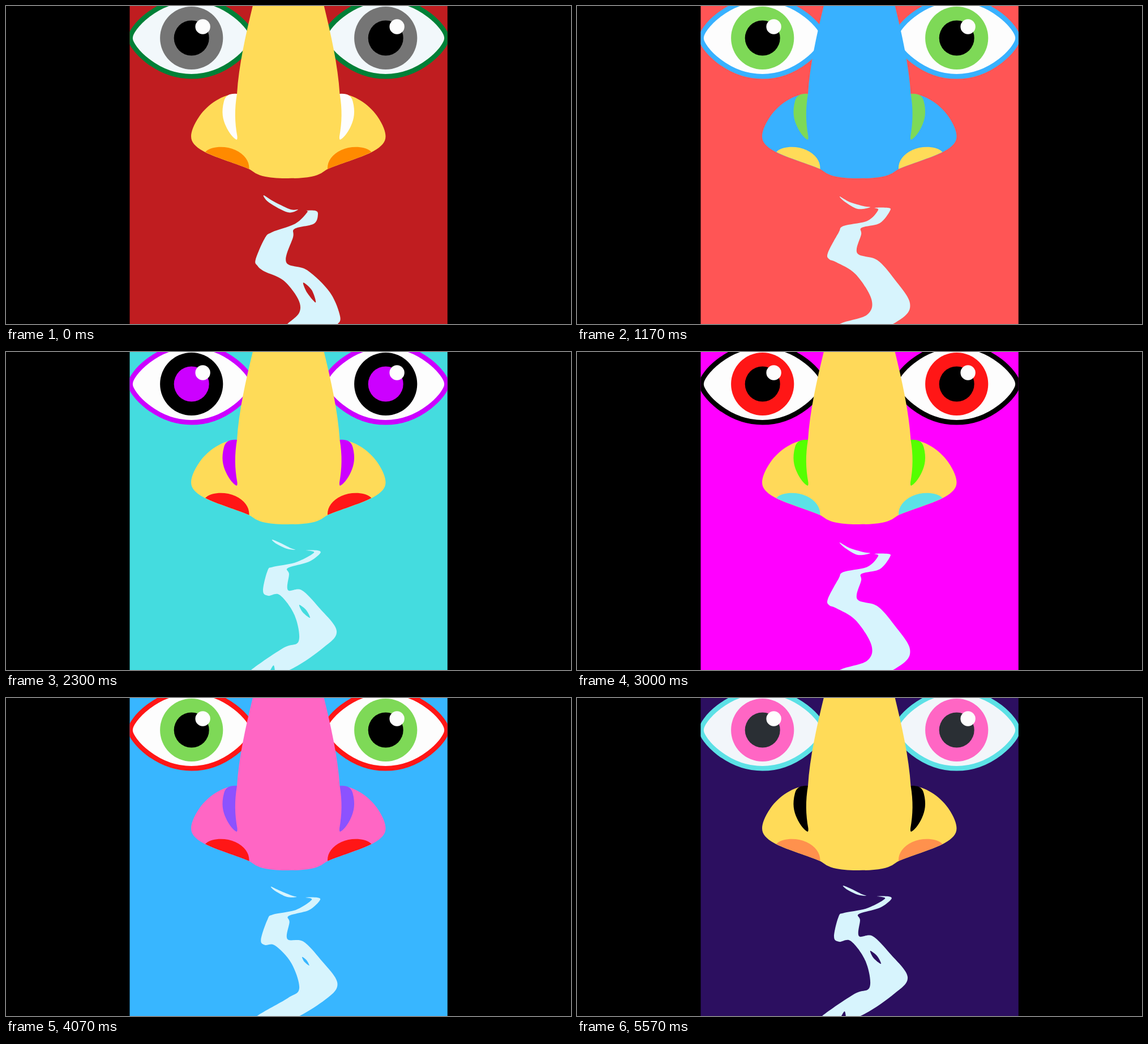
These frames come from a looping animation (998x561 px, 5.6 s). An HTML page:

```html
<!DOCTYPE html>
<html lang="en">
<head>
<meta charset="utf-8">
<title>Breath</title>
<style>
  html, body { margin: 0; height: 100%; overflow: hidden; background: #000; }
  svg { display: block; width: 100vw; height: 100vh; }
  .bg { fill: var(--bg); }
  .lid { fill: var(--white); stroke: var(--lid); stroke-width: 8.6; }
  .iris { fill: var(--iris); }
  .pupil { fill: var(--pupil); }
  .glint { fill: #fdfdfd; }
  .nose { fill: var(--nose); }
  .crease { fill: var(--crease); }
  .nostril { fill: var(--nostril); }
  .smoke { fill: #d7f4fd; fill-rule: evenodd; }
</style>
</head>
<body>
<svg viewBox="0 0 998 561">
  <defs>
    <clipPath id="card"><rect x="218.5" width="561.3" height="561"/></clipPath>
    <g id="eye">
      <path class="lid" d="M219.5 56.5C219.5 74 266 124.3 327.5 124.3S435.5 74 435.5 56.5S389 -11.3 327.5 -11.3S219.5 39 219.5 56.5Z"/>
      <circle class="iris" cx="327.7" cy="56.5" r="55.6"/>
      <circle class="pupil" cx="327.7" cy="56.5" r="31"/>
      <circle class="glint" cx="347.6" cy="36.5" r="13.2"/>
    </g>
    <g id="half">
      <path class="nose" d="M436 -1C424 48 411 105 408 155C383 155 356 174 342 194C331 210 327 222 327 230C327 241 335 249 352 258C372 268 410 279 430 288C437 292 442 298 458 301C470 303.5 484 304 499.5 304V-1Z"/>
      <path class="crease" d="M408 155C396 154 388 157 385 168C380 187 383 200 388 211C394 225 403 234 406.5 235.5Q409 237 408.5 230C404 205 403.5 182 408 155Z"/>
      <path class="nostril" d="M352 257.5C362 247 388 246 405 254C422 262 430 274 429.5 287.5C410 279 372 268 352 257.5Z"/>
    </g>
  </defs>
  <rect width="998" height="561"/>
  <g clip-path="url(#card)">
    <rect class="bg" x="218" width="563" height="561"/>
    <use href="#eye"/>
    <use href="#eye" x="343"/>
    <use href="#half"/>
    <use href="#half" transform="translate(997.5) scale(-1 1)"/>
    <path class="smoke" id="smoke"/>
  </g>
</svg>
<script>
const LOOP = 5600, FRAMES = 168, PER_CARD = 14;

const keys = ['bg', 'lid', 'iris', 'pupil', 'nose', 'crease', 'nostril', 'white'];
const cards = [
  '#c01d20 #008037 #757575 #000 #ffdb58 #fdfdfd #ff8a00 #f2f8fb',
  '#5ce1e6 #000 #ff914d #000 #ff66c4 #ffde59 #8c52ff #fdfdfd',
  '#ff5555 #38b1ff #7ed957 #000 #38b1ff #7ed957 #ffdb58 #fdfdfd',
  '#ff914d #004aad #8c52ff #000 #7ed957 #004aad #ff1616 #fdfdfd',
  '#44dcdf #cc00ff #000 #cc00ff #fedb58 #cc00ff #ff1616 #fdfdfd',
  '#7ed957 #000 #38b6ff #000 #ff914d #ff1616 #000 #fdfdfd',
  '#ff00ff #000 #ff1616 #000 #ffd959 #55ff00 #5ce1e6 #fdfdfd',
  '#fddb58 #000 #004aad #000 #ff1616 #004aad #000 #fdfdfd',
  '#38b6ff #ff1616 #7ed957 #000 #ff66c4 #8c52ff #ff1616 #fdfdfd',
  '#000 #ffff00 #c969e6 #000 #ff914d #fff900 #8c52ff #fdfdfd',
  '#ff66c4 #004aad #5ce1e6 #000 #ffde59 #ff1616 #ff914d #fdfdfd',
  '#2c0f60 #5ce1e6 #ff66c4 #2a2f34 #ffdb58 #000 #ff914d #f2f6fa'
].map(row => row.split(' '));

// Smoke outlines in three poses: low, middle and high.
const ribbonLow = [
  530,361, 546,361, 551,367, 544,384, 510,393, 507,408, 495,452, 532,466,
  572,505, 590,547, 584,563, 560,580, 480,580, 497,561, 518,541, 516,517,
  490,484, 456,468, 444,458, 441,447, 457,410, 470,399, 511,384, 532,364];
const ribbonMid = [
  526,356, 549,356, 553,361, 535,383, 503,391, 502,403, 495,436, 530,448,
  560,481, 588,524, 571,553, 500,585, 430,585, 464,561, 512,545, 520,517,
  492,473, 458,452, 446,447, 443,436, 462,400, 471,388, 513,379, 532,360];
const ribbonHigh = [
  530,350, 550,350, 555,355, 535,370, 498,381, 500,392, 498,420, 522,420,
  553,451, 584,492, 560,522, 496,563, 420,580, 433,561, 490,522, 517,510,
  510,465, 484,429, 463,430, 454,421, 462,386, 472,379, 512,371, 544,354];

const wispLow = [455,334, 475,346, 503,359, 516,359, 498,364, 465,347];
const wispMid = [464,336, 482,346, 506,353, 518,355, 496,358, 474,346];
const wispHigh = [470,331, 485,337, 503,346, 511,349, 496,347, 477,338];

const holeLow = [525,488, 540,501, 547,523, 532,506];
const holeHigh = [518,446, 530,455, 537,469, 524,459];
const notchHigh = [461,571, 467,561, 473,553, 474,568];

const dot = (x, y) => [x, y, x, y, x, y, x, y];
const shapes = [
  [ribbonLow, ribbonMid, ribbonHigh],
  [wispLow, wispMid, wispHigh],
  [holeLow, dot(533, 478), holeHigh],
  [dot(520, 620), dot(480, 600), notchHigh]
];

function pose(shape, k) {
  const i = k < 1 ? 0 : 1, f = k - i;
  return shape[i].map((v, j) => v + (shape[i + 1][j] - v) * f);
}

// Closed smooth curve through the points.
function curve(p) {
  const n = p.length / 2;
  const at = i => { const j = (i + n) % n * 2; return [p[j], p[j + 1]]; };
  let d = 'M' + at(0);
  for (let i = 0; i < n; i++) {
    const [a, b, c, e] = [at(i - 1), at(i), at(i + 1), at(i + 2)];
    const c1 = b.map((v, j) => v + (c[j] - a[j]) / 6);
    const c2 = c.map((v, j) => v - (e[j] - b[j]) / 6);
    d += `C${c1} ${c2} ${c}`;
  }
  return d + 'Z';
}

const smoke = document.getElementById('smoke');
const rises = Array.from({ length: 7 }, (_, s) =>
  shapes.map(shape => curve(pose(shape, s / 3))).join(''));

let shown = -1;
function draw(now) {
  const frame = Math.floor((now % LOOP) / LOOP * FRAMES + 0.01) % FRAMES;
  if (frame === shown) return;
  shown = frame;
  const colors = cards[Math.floor(frame / PER_CARD)];
  keys.forEach((key, i) => document.documentElement.style.setProperty('--' + key, colors[i]));
  smoke.setAttribute('d', rises[Math.floor(frame % PER_CARD / 2)]);
}

const start = performance.now();
function tick() {
  draw(performance.now() - start);
  requestAnimationFrame(tick);
}
tick();
</script>
</body>
</html>
```
